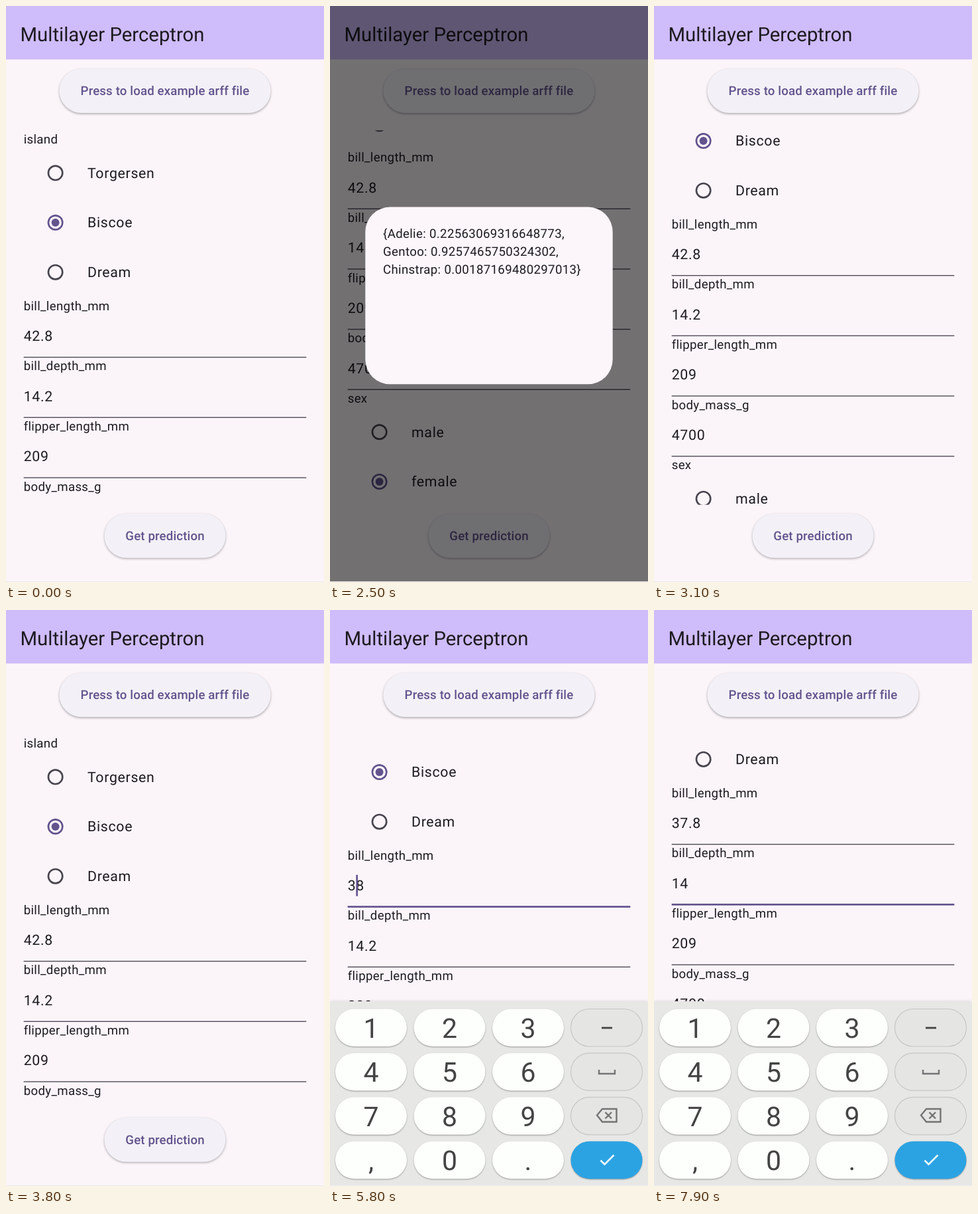
These frames come from a looping animation (480x867 px, 8 s). An HTML page with a canvas:

```html
<!DOCTYPE html>
<html lang="en">
<head>
<meta charset="utf-8">
<title>Multilayer Perceptron</title>
<style>
html, body { margin: 0; width: 100%; height: 100%; overflow: hidden; background: #fbf5fa; }
canvas { display: block; }
</style>
</head>
<body>
<canvas id="stage" width="480" height="867"></canvas>
<script>
const ctx = document.getElementById('stage').getContext('2d');
const DP = 4 / 3, LOOP = 8000, LEFT = 20 * DP;
const LIST_TOP = 187.3, LIST_BOTTOM = 750.7, KEYBOARD_TOP = 589;
const INK = '#1d1b20', PRIMARY = '#63538d', SURFACE = '#fbf5fa', OUTLINE = '#49454f';

// Text styles: size, letter spacing (both in dp), weight
const TITLE = [22, 0, 400], BODY = [14, 0.25, 400], INPUT = [16, 0.5, 400], BUTTON = [14, 0.1, 500];

// Edits per field: time, value, caret index
const lengthEdits = [[0, '42.8', 3], [4800, '42.8', 3], [4800, '428', 2], [5000, '48', 1], [5200, '8', 0],
  [5600, '38', 1], [6000, '378', 2], [6400, '37.8', 3]];
const depthEdits = [[0, '14.2', 4], [7050, '14.', 3], [7400, '14', 2]];
const FOCUS = [4000, 6600];
// Key presses: time, column, row
const presses = [[4760, 3, 2], [4960, 3, 2], [5160, 3, 2], [5560, 2, 0], [5960, 0, 2], [6360, 2, 3],
  [7010, 3, 2], [7360, 3, 2]];

const clamp = x => Math.min(1, Math.max(0, x));
const progress = (t, from, to) => clamp((t - from) / (to - from));
const smooth = p => p * p * (3 - 2 * p);
const easeOut = p => 1 - (1 - p) ** 3;
const current = (edits, t) => edits.filter(e => e[0] <= t).pop();

function setStyle([size, spacing, weight]) {
  ctx.font = `${weight} ${size * DP}px Roboto, sans-serif`;
  ctx.letterSpacing = spacing * DP + 'px';
}

function text(str, x, y, style, color = INK, align = 'left') {
  setStyle(style);
  ctx.fillStyle = color;
  ctx.textAlign = align;
  ctx.fillText(str, x, y);
}

function rect(x, y, w, h, color) {
  ctx.fillStyle = color;
  ctx.fillRect(x, y, w, h);
}

function rounded(x, y, w, h, r, fill) {
  ctx.beginPath();
  ctx.roundRect(x, y, w, h, r);
  ctx.fillStyle = fill;
  ctx.fill();
}

function stroke(points, color, width) {
  ctx.beginPath();
  points.forEach(([x, y]) => ctx.lineTo(x, y));
  ctx.strokeStyle = color;
  ctx.lineWidth = width;
  ctx.stroke();
}

function shadow(color, blur, dy) {
  ctx.shadowColor = color;
  ctx.shadowBlur = blur;
  ctx.shadowOffsetY = dy;
}

function button(label, cy, width, pressed = 0) {
  ctx.save();
  shadow('rgba(0,0,0,.32)', 3.5, 1.4);
  rounded(240 - width / 2, cy - 33.3, width, 66.6, 33.3, '#f3f1f7');
  ctx.restore();
  if (pressed) rounded(240 - width / 2, cy - 33.3, width, 66.6, 33.3, `rgba(99,83,141,${0.1 * pressed})`);
  text(label, 240, cy + 6.4, BUTTON, PRIMARY, 'center');
}

function radio(label, cy, selected) {
  const x = 74.6;
  ctx.beginPath();
  ctx.arc(x, cy, 10.67, 0, 7);
  ctx.lineWidth = 2.67;
  ctx.strokeStyle = selected ? PRIMARY : OUTLINE;
  ctx.stroke();
  if (selected) {
    ctx.beginPath();
    ctx.arc(x, cy, 6, 0, 7);
    ctx.fillStyle = PRIMARY;
    ctx.fill();
  }
  text(label, 123, cy + 7.3, INPUT);
}

function field(label, value, top, focused) {
  text(label, LEFT, top + 19.7, BODY);
  text(value, LEFT, top + 66, INPUT);
  const h = focused ? 2.67 : 1.33;
  rect(LEFT, top + 90.67 - h / 2, 426.67, h, focused ? PRIMARY : OUTLINE);
}

function caret(edit, focusTime, top, t) {
  setStyle(INPUT);
  const x = LEFT + ctx.measureText(edit[1].slice(0, edit[2])).width;
  const cy = top + 58.67;
  if ((t - Math.max(edit[0], focusTime)) % 1000 < 500) rect(x, cy - 16, 2.67, 32, PRIMARY);
  if (edit[0]) return;
  // Drag handle, until the first edit
  ctx.save();
  ctx.translate(x + 1, cy + 36.6);
  ctx.rotate(Math.PI / 4);
  rounded(-14.67, -14.67, 29.33, 29.33, [0, 14.67, 14.67, 14.67], PRIMARY);
  ctx.restore();
}

function scrollAt(t) {
  if (t < 2600) return 223.4 * smooth(progress(t, 600, 1500));
  if (t < 4200) return 223.4 * (1 - smooth(progress(t, 2700, 3560)));
  return 82 * easeOut(progress(t, 4300, 4490)) + 94 * easeOut(progress(t, 6650, 6850));
}

function form(t) {
  const focused = t < FOCUS[0] ? -1 : t < FOCUS[1] ? 0 : 1;
  const edits = [current(lengthEdits, t), current(depthEdits, t)];
  const rows = [['bill_length_mm', edits[0][1]], ['bill_depth_mm', edits[1][1]],
    ['flipper_length_mm', '209'], ['body_mass_g', '4700']];
  ctx.save();
  ctx.beginPath();
  ctx.rect(0, LIST_TOP, 480, LIST_BOTTOM - LIST_TOP);
  ctx.clip();
  ctx.translate(0, -scrollAt(t));
  text('island', LEFT, 207.2, BODY);
  ['Torgersen', 'Biscoe', 'Dream'].forEach((name, i) => radio(name, 251.3 + i * 74.67, i === 1));
  const top = i => 438 + i * 90.67;
  rows.forEach(([label, value], i) => field(label, value, top(i), i === focused));
  text('sex', LEFT, top(4) + 19.7, BODY);
  radio('male', 864.67, false);
  radio('female', 939.33, true);
  if (focused >= 0) caret(edits[focused], FOCUS[focused], top(focused), t);
  ctx.restore();
}

function dialog(t) {
  const alpha = t < 2400 ? smooth(progress(t, 1560, 1800)) : 1 - smooth(progress(t, 2500, 2680));
  if (!alpha) return;
  ctx.save();
  ctx.globalAlpha = alpha;
  rect(0, 0, 480, 867, 'rgba(0,0,0,.54)');
  rounded(53.3, 302.6, 373.4, 266.7, 37.3, '#fcf6fb');
  ['{Adelie: 0.22563069316648773,', 'Gentoo: 0.9257465750324302,', 'Chinstrap: 0.00187169480297013}']
    .forEach((line, i) => text(line, 80, 349.2 + i * 26.67, BODY));
  ctx.restore();
}

function keyboard(t) {
  const open = easeOut(progress(t, 4250, 4576));
  if (!open) return;
  ctx.save();
  ctx.translate(0, (867 - KEYBOARD_TOP) * (1 - open));
  ctx.save();
  shadow('rgba(0,0,0,.15)', 4, 0);
  rect(0, KEYBOARD_TOP, 480, 300, '#e7e8e6');
  ctx.restore();
  ['123-', '456_', '789<', ',0.>'].forEach((keys, row) => [...keys].forEach((key, col) => {
    const x = 8 + col * 118.5, y = 600.5 + row * 66.4;
    const side = col === 3, enter = key === '>';
    ctx.save();
    if (!side || enter) shadow('rgba(0,0,0,.35)', 2, 1);
    rounded(x, y, 108, 56.5, 28.25, enter ? '#2ba3e3' : side ? '#e5e6e4' : '#fdfffc');
    ctx.restore();
    if (side && !enter) {
      ctx.strokeStyle = '#c6c7c5';
      ctx.lineWidth = 1.2;
      ctx.stroke();
    }
    if (presses.some(p => p[1] === col && p[2] === row && t >= p[0] && t < p[0] + 100)) {
      ctx.fillStyle = 'rgba(0,0,0,.1)';
      ctx.fill();
    }
    if (!side) text(key, x + 54, y + 43.3, [30.75, 0, 400], '#434443', 'center');
  }));
  rect(410, 627.6, 16, 2.8, '#434443');
  stroke([[406, 692], [406, 698], [430, 698], [430, 692]], '#737473', 2.4);
  stroke([[403, 760.5], [411, 751], [432.5, 751], [432.5, 770.5], [411, 770.5], [403, 760.5], [411, 751]], '#737473', 2.4);
  stroke([[415.5, 756], [425, 765.5]], '#737473', 2.4);
  stroke([[425, 756], [415.5, 765.5]], '#737473', 2.4);
  stroke([[408.5, 828.5], [414.5, 834.5], [428.5, 820.5]], '#fff', 2.5);
  ctx.restore();
}

function draw(now) {
  const t = now % LOOP;
  ctx.textRendering = 'geometricPrecision';
  rect(0, 0, 480, 867, SURFACE);
  rect(0, 0, 480, 80.5, '#cfbcfb');
  text('Multilayer Perceptron', 21.5, 52.5, TITLE);
  button('Press to load example arff file', 127.8, 319);
  form(t);
  button('Get prediction', 797.4, 183, t > 1500 && t < 1750 ? 1 : 0);
  dialog(t);
  keyboard(t);
  rect(0, 866, 480, 1, '#ececec');
  requestAnimationFrame(draw);
}
requestAnimationFrame(draw);
</script>
</body>
</html>
```
